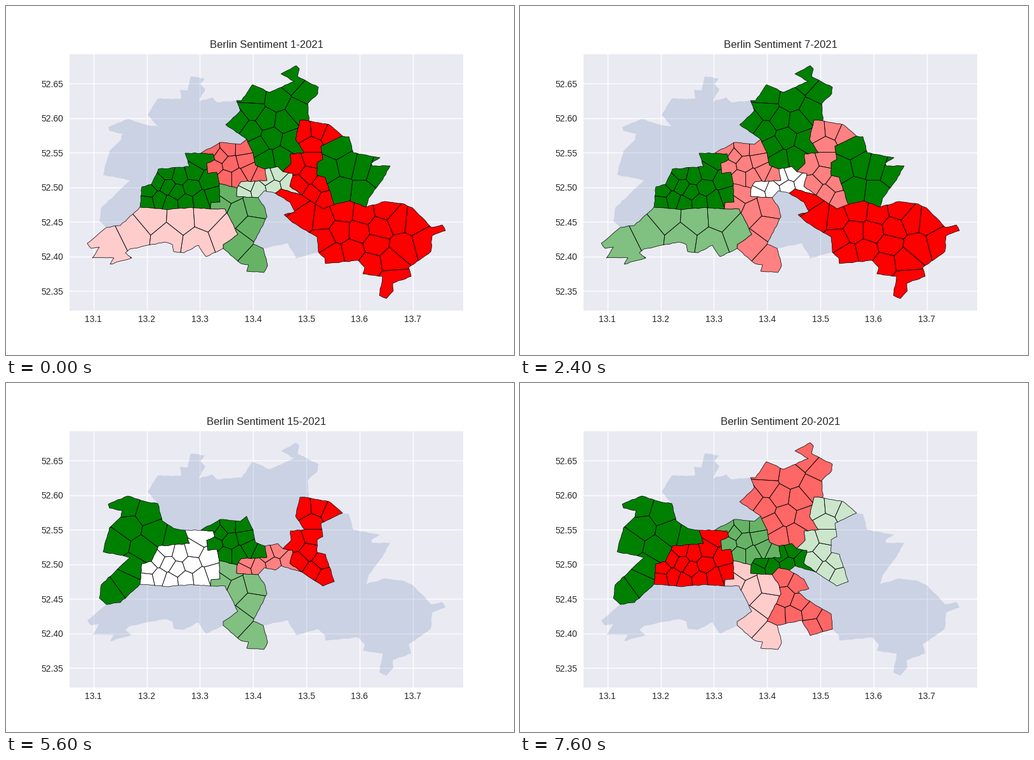
Write a matplotlib script that moves like this. It is 800x550 px and loops after 8 s.

```python
import matplotlib.pyplot as plt
import numpy as np
from matplotlib.animation import FuncAnimation
from matplotlib.collections import PolyCollection
from matplotlib.patches import PathPatch, Polygon
from matplotlib.path import Path

plt.rcParams["font.family"] = "Liberation Sans"
INK = "#262626"
N = None
WEEKS = 20
rng = np.random.default_rng(7)

fig = plt.figure(figsize=(8, 5.5), dpi=100, facecolor="white")
ax = fig.add_axes([100 / 800, 70 / 550, 620 / 800, 404 / 550], facecolor="#eaeaf2")
ax.set(xlim=(100, 720), ylim=(480, 76))
ax.set_xticks([137.8 + 83.8 * i for i in range(7)], [f"{13.1 + i / 10:.1f}" for i in range(7)])
ax.set_yticks([122.2 + 54.5 * i for i in range(7)], [f"{52.65 - i / 20:.2f}" for i in range(7)])
ax.tick_params(length=0, pad=7, labelsize=10, labelcolor=INK)
ax.tick_params(axis="x", pad=5.3)
ax.grid(color="white", linewidth=1)
ax.set_axisbelow(True)
for spine in ax.spines.values():
    spine.set_visible(False)
title = ax.set_title("", fontsize=12, color=INK, pad=7)


def arc(*n):
    """Join key points with a slightly ragged line."""
    keys = np.reshape(n, (-1, 2)).astype(float)
    path = [tuple(keys[0])]
    for a, b in zip(keys, keys[1:]):
        d = b - a
        length = np.hypot(*d)
        normal = np.array([-d[1], d[0]]) / length
        steps = max(1, int(length / 5))
        path += [tuple(a + d * i / steps + normal * rng.uniform(-0.7, 0.7)) for i in range(1, steps)]
        path.append(tuple(b))
    return path


def ring(*arcs):
    """Chain arcs end to end, flipping each one where needed."""
    first, second = arcs[:2]
    points = list(first if first[-1] in (second[0], second[-1]) else first[::-1])
    for part in arcs[1:]:
        points += (part if part[0] == points[-1] else part[::-1])[1:]
    area = sum(a[0] * b[1] - b[0] * a[1] for a, b in zip(points, points[1:]))
    return points if area > 0 else points[::-1]


def spread(outline, count):
    """Evenly spaced centres inside an outline, by k-means."""
    xy = np.array(outline)
    (x0, y0), (x1, y1) = xy.min(0), xy.max(0)
    grid = np.array([(x, y) for x in np.arange(x0, x1, 2.5) for y in np.arange(y0, y1, 2.5)])
    grid = grid[Path(outline).contains_points(grid)]
    centres = rng.choice(grid, count, replace=False)
    for _ in range(8):
        nearest = ((grid[:, None] - centres) ** 2).sum(2).argmin(1)
        centres = np.array([grid[nearest == k].mean(0) for k in range(count)])
    return centres


def cut(poly, middle, normal):
    """Keep the part of a convex polygon behind a line."""
    kept = []
    for a, b in zip(poly, poly[1:] + poly[:1]):
        da, db = (a - middle) @ normal, (b - middle) @ normal
        if da <= 0:
            kept.append(a)
        if da * db < 0:
            kept.append(a + (b - a) * da / (da - db))
    return kept


def voronoi(centres):
    cells = []
    for k, centre in enumerate(centres):
        cell = [np.array(p, float) for p in ((0, 0), (800, 0), (800, 550), (0, 550))]
        for other in np.delete(centres, k, axis=0):
            cell = cut(cell, (centre + other) / 2, other - centre)
        cells.append(cell)
    return cells


def tint(level):
    strong = (0, 128 / 255, 0) if level > 0 else (1, 0, 0)
    return tuple(1 + (c - 1) * abs(level) for c in strong)


districts = []


def district(outline, quarters, levels):
    """Add a district; levels maps a week to the mood held from then on."""
    shape = Polygon(outline, facecolor="white", edgecolor="black", linewidth=0.5, zorder=3)
    ax.add_patch(shape)
    borders = PolyCollection(voronoi(spread(outline, quarters)), facecolors="none",
                             edgecolors="black", linewidths=0.5, zorder=4)
    ax.add_collection(borders, autolim=False)
    borders.set_clip_path(shape)
    districts.append((shape, borders, levels))


# Outer rims, clockwise from the west
spandau_rim = arc(158, 349, 147, 339, 150, 318, 195, 275, 153, 266, 163, 228, 181, 211, 183, 201,
                  163, 197, 161, 191, 192, 178, 224, 188, 239, 190)
rein_rim = arc(239, 190, 223, 172, 239, 146, 276, 146, 274, 132, 286, 133, 291, 111, 313, 114,
               306, 123, 314, 131, 304, 150, 325, 144, 333, 152, 363, 149)
pankow_rim = arc(363, 149, 371, 149, 388, 124, 415, 136, 454, 119, 433, 107, 457, 94, 462, 99,
                 459, 111, 492, 128, 491, 138, 475, 154, 477, 181)
licht_rim = arc(477, 181, 509, 187, 530, 205)
marzahn_rim = arc(530, 205, 540, 206, 547, 231, 589, 239, 575, 248, 577, 252, 605, 252, 593, 274,
                  571, 303, 567, 317)
treptow_rim = arc(567, 317, 597, 308, 627, 312, 640, 318, 670, 349, 687, 345, 692, 354, 671, 362,
                  669, 387, 634, 412, 638, 426, 609, 437, 610, 449, 599, 461, 588, 456, 593, 426,
                  562, 422, 565, 412, 555, 401, 503, 406, 502, 397, 492, 388)
neuk_rim = arc(492, 388, 457, 398, 444, 374, 405, 382)
tempel_rim = arc(405, 382, 412, 409, 406, 420, 379, 418, 382, 408, 370, 406, 342, 382)
steglitz_rim = arc(342, 382, 315, 395, 303, 377, 280, 389, 264, 387, 262, 376, 250, 372, 195, 383,
                   188, 389, 198, 397, 164, 407, 170, 397, 136, 397, 147, 380, 134, 382, 128, 374,
                   158, 349)

# Shared borders, named after the two neighbours
sp_re = arc(239, 190, 246, 217, 264, 229, 282, 232)
sp_cw = arc(282, 232, 289, 253, 240, 257, 229, 281, 214, 285, 211, 317)
sp_sz = arc(211, 317, 180, 346, 158, 349)
re_pa = arc(363, 149, 369, 165, 346, 187, 379, 210)
re_mi = arc(379, 210, 369, 218, 337, 215, 307, 232)
cw_re = arc(307, 232, 282, 232)
cw_mi = arc(307, 232, 326, 233, 329, 242, 316, 248, 318, 264, 332, 262, 336, 280)
mi_pa = arc(379, 210, 389, 231, 393, 251, 408, 257)
mi_ts = arc(336, 280, 364, 287)
mi_fk = arc(408, 257, 411, 275, 370, 277, 364, 287)
pa_fk = arc(408, 257, 428, 253, 436, 261)
pa_li = arc(477, 181, 463, 180, 456, 210, 470, 231, 448, 233, 449, 248, 436, 261)
li_fk = arc(436, 261, 452, 264, 447, 284, 466, 298)
fk_tk = arc(466, 298, 433, 288, 424, 295)
fk_ne = arc(424, 295, 407, 291, 397, 302)
ts_fk = arc(364, 287, 363, 300, 397, 302)
li_mh = arc(530, 205, 496, 221, 499, 242, 490, 247, 490, 267, 503, 270, 517, 313)
li_tk = arc(466, 298, 499, 320, 517, 313)
mh_tk = arc(567, 317, 541, 307, 517, 313)
ne_tk = arc(424, 295, 447, 309, 455, 324, 438, 329, 451, 341, 490, 364, 492, 388)
ts_ne = arc(397, 302, 408, 319, 411, 332, 389, 375, 405, 382)
ts_sz = arc(322, 320, 345, 320, 365, 360, 342, 376, 342, 382)
cw_ts = arc(336, 280, 337, 309, 323, 310, 322, 320)
cw_sz = arc(211, 317, 256, 321, 286, 318, 322, 320)

# Reinickendorf, Pankow, Spandau
district(ring(rein_rim, re_pa, re_mi, cw_re, sp_re), 15,
         {1: N, 2: 1, 6: N, 9: 1, 11: N, 17: 0, 18: N})
district(ring(pankow_rim, pa_li, pa_fk, mi_pa, re_pa), 15,
         {1: 1, 8: N, 16: -1, 20: -.6})
district(ring(spandau_rim, sp_re, sp_cw, sp_sz), 10,
         {1: N, 4: 1, 6: N, 10: 1, 18: N, 19: 1})

# Charlottenburg-Wilmersdorf, Mitte, Friedrichshain-Kreuzberg
district(ring(cw_re, cw_mi, cw_ts, cw_sz, sp_cw), 16,
         {1: 1, 4: -.6, 5: 1, 10: -1 / 3, 12: 0, 16: -.75, 18: -1})
district(ring(re_mi, cw_mi, mi_ts, mi_fk, mi_pa), 11,
         {1: -.6, 3: .2, 6: -.5, 8: -1, 12: 1, 16: 0, 18: .6})
district(ring(pa_fk, li_fk, fk_tk, fk_ne, ts_fk, mi_fk), 7,
         {1: .2, 3: -.2, 6: 0, 9: 1 / 3, 12: -.5, 16: -.25, 18: 1})

# Lichtenberg, Marzahn-Hellersdorf, Treptow-Köpenick
district(ring(licht_rim, li_mh, li_tk, li_fk, pa_li), 11,
         {1: -1, 6: -.5, 8: .5, 10: 1, 14: -1, 16: 0, 18: .2})
district(ring(marzahn_rim, mh_tk, li_mh), 7,
         {1: 1, 3: N, 4: 1, 9: N, 12: 1, 13: N, 17: -.5, 18: N, 19: -1, 20: N})
district(ring(treptow_rim, ne_tk, fk_tk, li_tk, mh_tk), 20,
         {1: -1, 2: N, 5: -1, 8: N, 11: -1, 12: N, 16: -1, 17: N, 18: -1, 20: N})

# Neukölln, Tempelhof-Schöneberg, Steglitz-Zehlendorf
district(ring(ne_tk, neuk_rim, ts_ne, fk_ne), 9,
         {1: N, 3: -1, 6: N, 9: 1, 11: N, 18: -.6})
district(ring(mi_ts, ts_fk, ts_ne, tempel_rim, ts_sz, cw_ts), 7,
         {1: .6, 6: -.5, 10: -1 / 3, 12: .5, 16: .25, 18: -.2})
district(ring(steglitz_rim, sp_sz, cw_sz, ts_sz), 8,
         {1: -.2, 3: 1, 4: -1, 5: .5, 8: N, 9: 1, 11: -1, 13: 1, 15: N, 16: 1, 20: N})

city = Path.make_compound_path(*(Path(d[0].get_xy(), closed=True) for d in districts))
ax.add_patch(PathPatch(city, facecolor="#4c72b0", alpha=0.2, linewidth=0, zorder=2))


def update(frame):
    week = frame + 1
    title.set_text(f"Berlin Sentiment {week}-2021")
    for shape, borders, levels in districts:
        level = levels[max(start for start in levels if start <= week)]
        for artist in (shape, borders):
            artist.set_visible(level is not None)
        if level is not None:
            shape.set_facecolor(tint(level))
    return []


anim = FuncAnimation(fig, update, frames=WEEKS, interval=400, repeat=True, repeat_delay=0)
plt.show()
```
